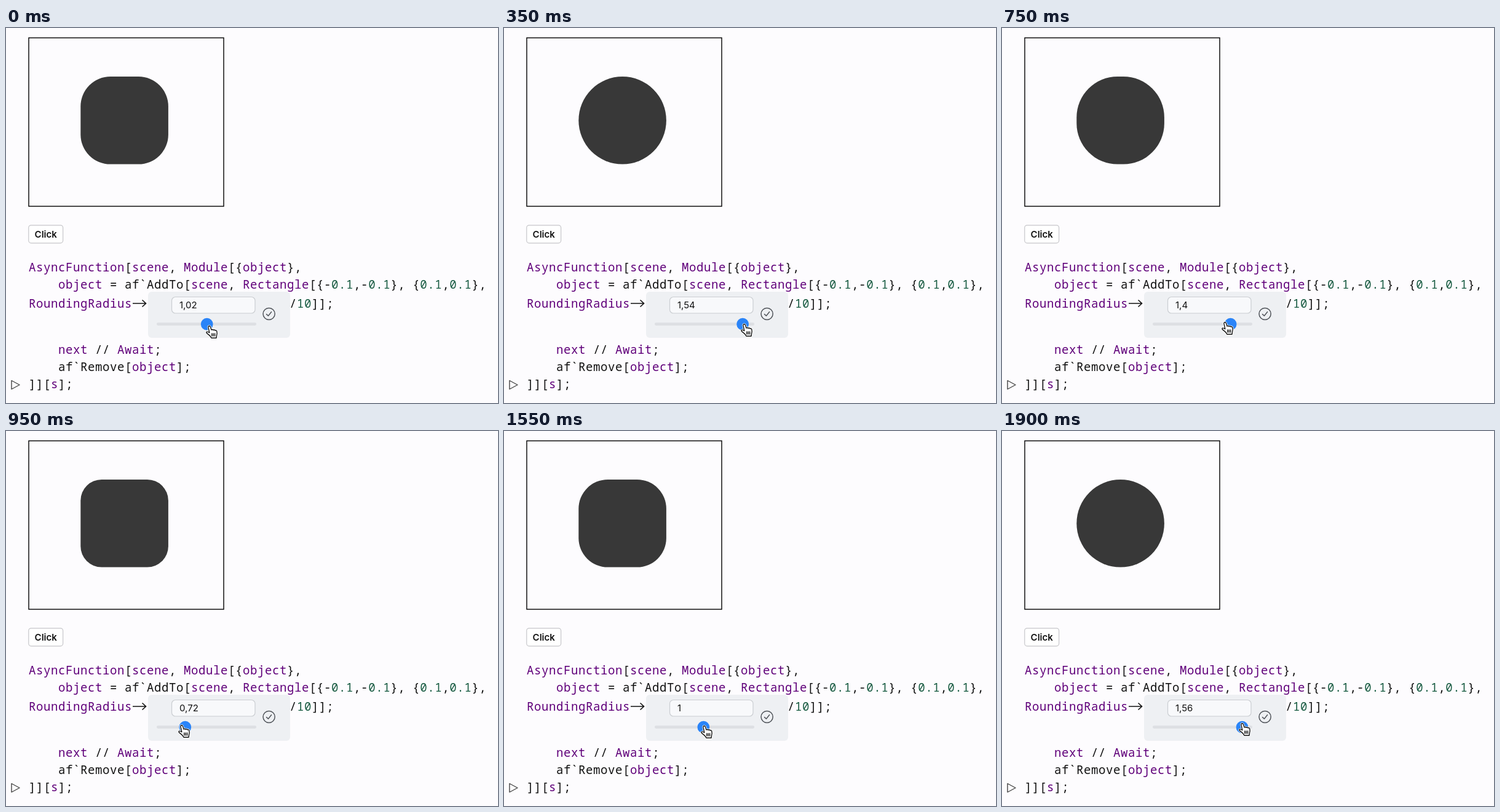
Animation of 800x610 px, one loop 1.95 s. Source, as an HTML page:

```html
<!DOCTYPE html>
<html lang="en">
<head>
<meta charset="utf-8">
<title>Rounding radius slider</title>
<style>
html, body { margin: 0; width: 100%; height: 100%; overflow: hidden; background: #fdfcfe; }
svg { display: block; width: 800px; height: 610px; }
.code { font: 19px "Noto Sans Mono", monospace; letter-spacing: .6px; white-space: pre; fill: #111; }
.v { fill: #60007a; }
.n { fill: #165a40; }
.ui { font: 15px Inter, sans-serif; fill: #111; }
</style>
</head>
<body>
<svg viewBox="0 0 800 610" fill="none">
  <rect x="37" y="16" width="317" height="274" stroke="#000" stroke-width="1.4"/>
  <rect id="shape" x="121.3" y="79" width="142.6" height="142.6" fill="#383838"/>

  <rect x="36.8" y="320.8" width="55.8" height="29" rx="4" fill="#fff" stroke="#c6c6ca" stroke-width="1.2"/>
  <text class="ui" x="64.7" y="341" text-anchor="middle" font-weight="600" style="font-weight:600">Click</text>

  <g class="code">
    <text x="37" y="396"><tspan class="v">AsyncFunction</tspan>[<tspan class="v">scene</tspan>, <tspan class="v">Module</tspan>[{<tspan class="v">object</tspan>},</text>
    <text x="85" y="424"><tspan class="v">object</tspan> = af`AddTo[<tspan class="v">scene</tspan>, <tspan class="v">Rectangle</tspan>[{-<tspan class="n">0.1</tspan>,-<tspan class="n">0.1</tspan>}, {<tspan class="n">0.1</tspan>,<tspan class="n">0.1</tspan>},</text>
    <text x="37" y="455" class="v">RoundingRadius</text>
    <text x="461" y="455">/<tspan class="n">10</tspan>]];</text>
    <text x="85" y="530"><tspan class="v">next</tspan> // <tspan class="v">Await</tspan>;</text>
    <text x="85" y="558">af`Remove[<tspan class="v">object</tspan>];</text>
    <text x="37" y="586">]][<tspan class="v">s</tspan>];</text>
  </g>
  <path d="M206 448H227M221.5 442.5L227.5 448L221.5 453.5" stroke="#111" stroke-width="1.6"/>
  <path d="M9 573.5L22 580.5L9 587.5Z" stroke="#444" stroke-width="1.4" stroke-linejoin="round"/>

  <rect x="231" y="429" width="231" height="75" rx="6" fill="#eef0f3"/>
  <rect x="269.5" y="437.5" width="135.5" height="26.5" rx="6" fill="#f8f9fb" stroke="#cbced2" stroke-width="1.2"/>
  <text id="label" class="ui" x="282" y="456"></text>
  <g stroke="#50545a" stroke-width="1.5" stroke-linecap="round" stroke-linejoin="round">
    <circle cx="427.6" cy="465" r="9.6"/>
    <path d="M423.6 465.6L426.4 468.2L431.6 461.8"/>
  </g>
  <rect x="245" y="479.3" width="162" height="4.6" rx="2.3" fill="#dddfe3"/>
  <circle id="knob" cy="481.7" r="9.9" fill="#2a84f8"/>
  <g id="hand" stroke-linejoin="round" stroke-linecap="round">
    <path id="palm" d="M4 3.2Q3.6 1 5.4 .8Q7 .6 7.5 2.4L9 7Q11 5.8 12 7.4Q14 6.4 15 8Q17.4 7.2 17.8 9.6Q18.6 13 17.6 15.6L17 20.2H9Q8 17.8 5.4 15.6L1.4 12.4Q.4 11 1.6 10.2Q3 9.8 5.8 11.6Z" fill="#fff" stroke="#fff" stroke-width="3"/>
    <use href="#palm" style="display:none"/>
    <path d="M4 3.2Q3.6 1 5.4 .8Q7 .6 7.5 2.4L9 7Q11 5.8 12 7.4Q14 6.4 15 8Q17.4 7.2 17.8 9.6Q18.6 13 17.6 15.6L17 20.2H9Q8 17.8 5.4 15.6L1.4 12.4Q.4 11 1.6 10.2Q3 9.8 5.8 11.6ZM9.8 13V17M12.2 13V17M14.6 13V17" stroke="#111" stroke-width="1.4"/>
  </g>
</svg>
<script>
const LOOP = 1950, STEP = 50;
const $ = id => document.getElementById(id);
const times = [0, 350, 550, 750, 950, 1150, 1350, 1550, 1900];
const values = [1.02, 1.54, 1.6, 1.4, .72, .4, .4, 1, 1.56];
const handX = [325, 385, 394, 357, 280, 245, 253, 320, 385];
const handY = [484, 481, 479, 478, 478, 479, 480, 479, 475];

// Smooth cubic curve through the keys
function curve(keys, t) {
  const last = times.length - 1;
  let i = 0;
  while (i < last - 1 && t >= times[i + 1]) i++;
  const slope = k => {
    const a = Math.max(k - 1, 0), b = Math.min(k + 1, last);
    return (keys[b] - keys[a]) / (times[b] - times[a]);
  };
  const h = times[i + 1] - times[i], u = (t - times[i]) / h;
  const ease = u * u * (3 - 2 * u);
  return keys[i] + (keys[i + 1] - keys[i]) * ease
    + h * u * (1 - u) * ((1 - u) * slope(i) - u * slope(i + 1));
}

function draw(now) {
  const t = Math.floor(now % LOOP / STEP) * STEP;
  const raw = Math.min(1.6, Math.max(.4, curve(values, t)));
  const value = Math.round(raw * 50) / 50;
  $("shape").setAttribute("rx", Math.min(71.3, value * 47.5));
  $("knob").setAttribute("cx", 253.5 + (value - .4) * 118.1);
  $("label").textContent = String(value).replace(".", ",");
  $("hand").setAttribute("transform", `translate(${curve(handX, t)} ${curve(handY, t)})`);
}

const start = performance.now();
function tick() {
  draw(performance.now() - start);
  requestAnimationFrame(tick);
}
tick();
</script>
</body>
</html>
```
